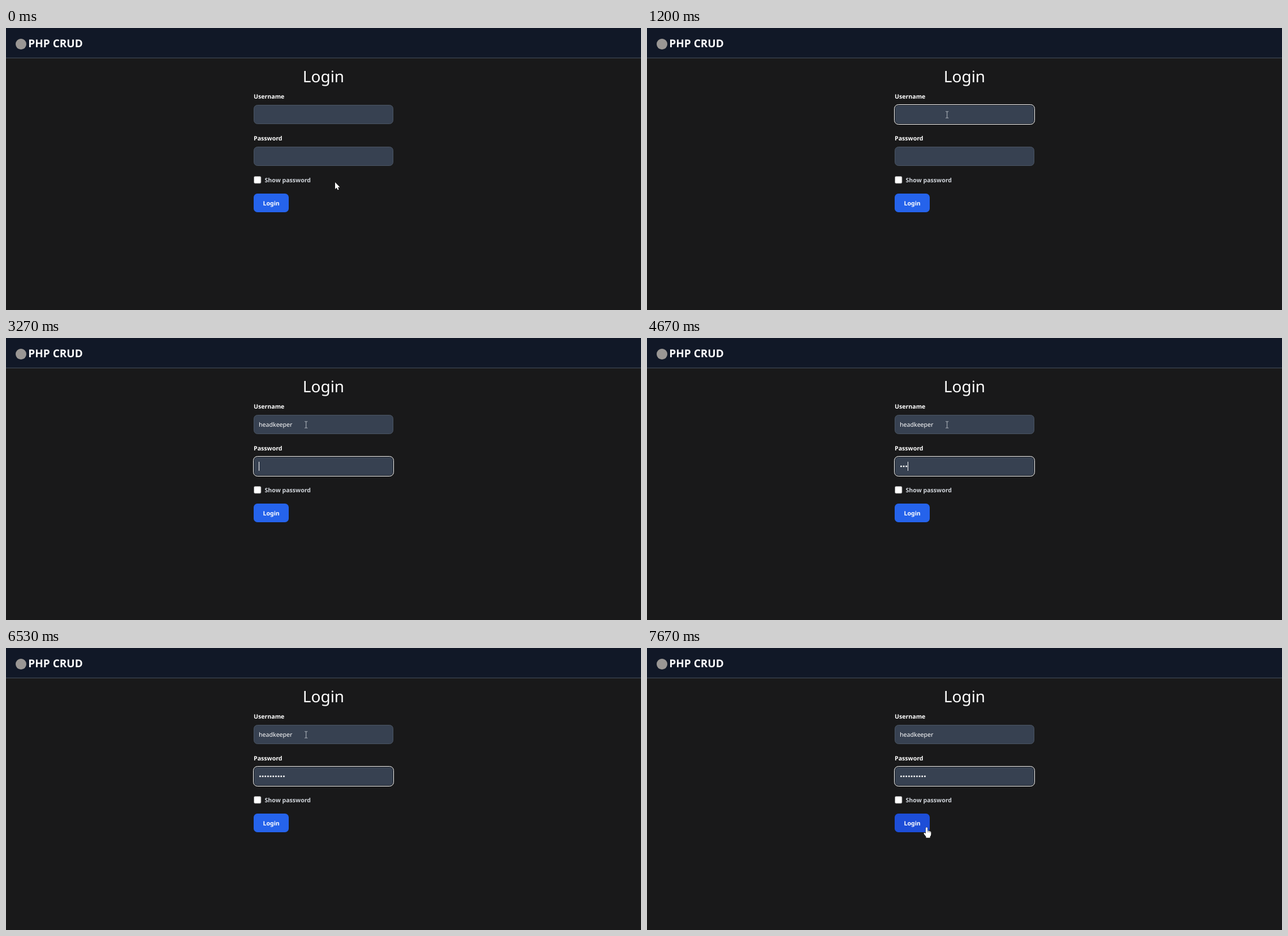
An HTML page that plays this animation: 1123x499 px, repeating every 8 s.

```html
<!DOCTYPE html>
<html lang="en">
<head>
<meta charset="utf-8">
<title>Login</title>
<style>
  html, body { margin: 0; width: 100%; height: 100%; overflow: hidden; background: #19191a; }
  svg { display: block; width: 100vw; height: 100vh; }
  text { font: 10.6px "Noto Sans", "Open Sans", sans-serif; fill: #fff; text-rendering: geometricPrecision; white-space: pre; }
  .bold { font-weight: 600; }
  .brand { font-size: 19px; font-weight: 600; }
  .heading { font-size: 28px; text-anchor: middle; }
  .field { fill: #374151; stroke: #4b5563; }
  .pointer { fill: #fff; stroke: #111; stroke-width: .7; paint-order: stroke; }
</style>
</head>
<body>
<svg viewBox="0 0 1123 499">
  <defs>
    <pattern id="dots" x="447" y="219" width="4.67" height="16" patternUnits="userSpaceOnUse">
      <circle cx="2.4" cy="8" r="1.5" fill="#fff"/>
    </pattern>
  </defs>

  <rect width="1123" height="499" fill="#19191a"/>
  <rect width="1123" height="53" fill="#111827"/>
  <rect y="52.5" width="1123" height="1" fill="#4b5563"/>
  <circle cx="26.5" cy="28.5" r="9.5" fill="#9a9794"/>
  <text class="brand" x="39.3" y="34.3">PHP CRUD</text>

  <text class="heading" x="561.5" y="95.5">Login</text>
  <text class="bold" x="438" y="125">Username</text>
  <rect class="field" x="438.5" y="136.5" width="246" height="33" rx="6.2"/>
  <text class="bold" x="438" y="199">Password</text>
  <rect class="field" x="438.5" y="210.5" width="246" height="33" rx="6.2"/>

  <g id="ring" fill="none">
    <rect x="438.5" y="136.5" width="246" height="33" rx="6.2" stroke="#15181d"/>
    <rect x="437.5" y="135.5" width="248" height="35" rx="7.2" stroke="#fff"/>
  </g>

  <text id="name" x="447" y="157"></text>
  <rect id="secret" x="447" y="219" height="16" fill="url(#dots)"/>
  <rect id="caret" width="1" height="16" fill="#fff"/>

  <rect x="438.5" y="262.5" width="12.5" height="12.5" rx="2" fill="#fff" stroke="#767676" stroke-width=".8"/>
  <text class="bold" x="457.5" y="273" style="fill:#d1d5db">Show password</text>
  <rect id="button" x="438" y="293" width="62" height="33" rx="6.6"/>
  <text class="bold" x="454.4" y="314">Login</text>

  <path id="arrow" class="pointer" d="M0 0V12L2.8 9.4 4.6 13.6 6.6 12.7 4.8 8.7H8.5Z"/>
  <path id="beam" fill="none" stroke="#c6cad0" stroke-width=".9"
        d="M-2.5-5.7H-.7Q0-5.7 0-5 0-5.7.7-5.7H2.5M0-5V5M-2.5 5.7H-.7Q0 5.7 0 5 0 5.7.7 5.7H2.5"/>
  <g id="hand">
    <path class="pointer" d="M-1.6 1.5Q-1.6 0 0 0T1.6 1.5V6.2Q3 5.6 4 6.6 5.4 6 6.2 7.2 7.8 7 7.8 9V12.5Q7.8 15 6 16.5V18.5H-1V16.5L-4.6 12Q-5.4 10.4-4.2 9.8T-1.6 11.2Z"/>
    <path fill="none" stroke="#333" stroke-width=".6" d="M1.6 6.2V9M4 6.6V9.2M6.2 7.2V9.6"/>
  </g>
</svg>
<script>
const LOOP = 8000, FPS = 15, BLINK = 530;
const LEFT = 447, DOT = 4.67, FIELD_GAP = 74;
const USER = "headkeeper";

// focus: when the field is entered; from, to: first and last key
const nameField = { focus: 670, from: 1400, to: 3000 };
const secretField = { focus: 3270, from: 4200, to: 6000 };

// pointer moves as cubic curves: x and y of start, two controls and end
const toName = { from: 0, to: 600, x: [582, 579, 562, 530.7], y: [273, 338, 298, 153.5] };
const toButton = { from: 6800, to: 7600, x: [530.7, 660, 447.6, 494.5], y: [153.5, 463.5, 299.6, 317.3] };

const $ = id => document.getElementById(id);
const ring = $("ring"), nameText = $("name"), secret = $("secret"), caret = $("caret"), button = $("button");
const pointers = { arrow: $("arrow"), beam: $("beam"), hand: $("hand") };

const clamp = (v, low, high) => Math.min(high, Math.max(low, v));
const inside = (v, low, high) => v >= low && v <= high;
const show = (el, on) => el.setAttribute("visibility", on ? "visible" : "hidden");

// keys pressed so far at an even pace, and when the field last changed
function typing({ focus, from, to }, t) {
  const gap = (to - from) / (USER.length - 1);
  const count = clamp(Math.floor((t - from) / gap) + 1, 0, USER.length);
  return { count, last: count ? from + (count - 1) * gap : focus };
}

function bezier([a, b, c, d], u) {
  const v = 1 - u;
  return a * v ** 3 + 3 * b * v * v * u + 3 * c * v * u * u + d * u ** 3;
}

function pointerKind(x, y) {
  const overField = inside(x, 438, 685) && (inside(y, 136, 170) || inside(y, 210, 244));
  const overButton = inside(x, 438, 500) && inside(y, 293, 326);
  return overField ? "beam" : overButton ? "hand" : "arrow";
}

function drawFields(t) {
  const name = typing(nameField, t), pass = typing(secretField, t);
  const onSecret = t >= secretField.focus, focused = t >= nameField.focus;
  const top = onSecret ? FIELD_GAP : 0;

  nameText.textContent = USER.slice(0, name.count);
  secret.setAttribute("width", pass.count * DOT);
  show(ring, focused);
  ring.setAttribute("transform", `translate(0 ${top})`);

  const last = (onSecret ? pass : name).last;
  const nameWidth = name.count ? nameText.getComputedTextLength() : 0;
  show(caret, focused && Math.floor((t - last) / BLINK) % 2 === 0);
  caret.setAttribute("x", Math.round(LEFT + (onSecret ? pass.count * DOT : nameWidth)));
  caret.setAttribute("y", 145 + top);
}

function drawPointer(t) {
  const move = t < toButton.from ? toName : toButton;
  const stepped = Math.floor(t * FPS / 1000) * 1000 / FPS;
  const u = clamp((stepped - move.from) / (move.to - move.from), 0, 1);
  const x = bezier(move.x, u), y = bezier(move.y, u);
  const kind = pointerKind(x, y);
  for (const key in pointers) show(pointers[key], key === kind);
  pointers[kind].setAttribute("transform", `translate(${x} ${y})`);
  button.setAttribute("fill", kind === "hand" ? "#1d4ed8" : "#2563eb");
}

const start = performance.now();
function tick() {
  const t = (performance.now() - start) % LOOP;
  drawFields(t);
  drawPointer(t);
  requestAnimationFrame(tick);
}
tick();
</script>
</body>
</html>
```
